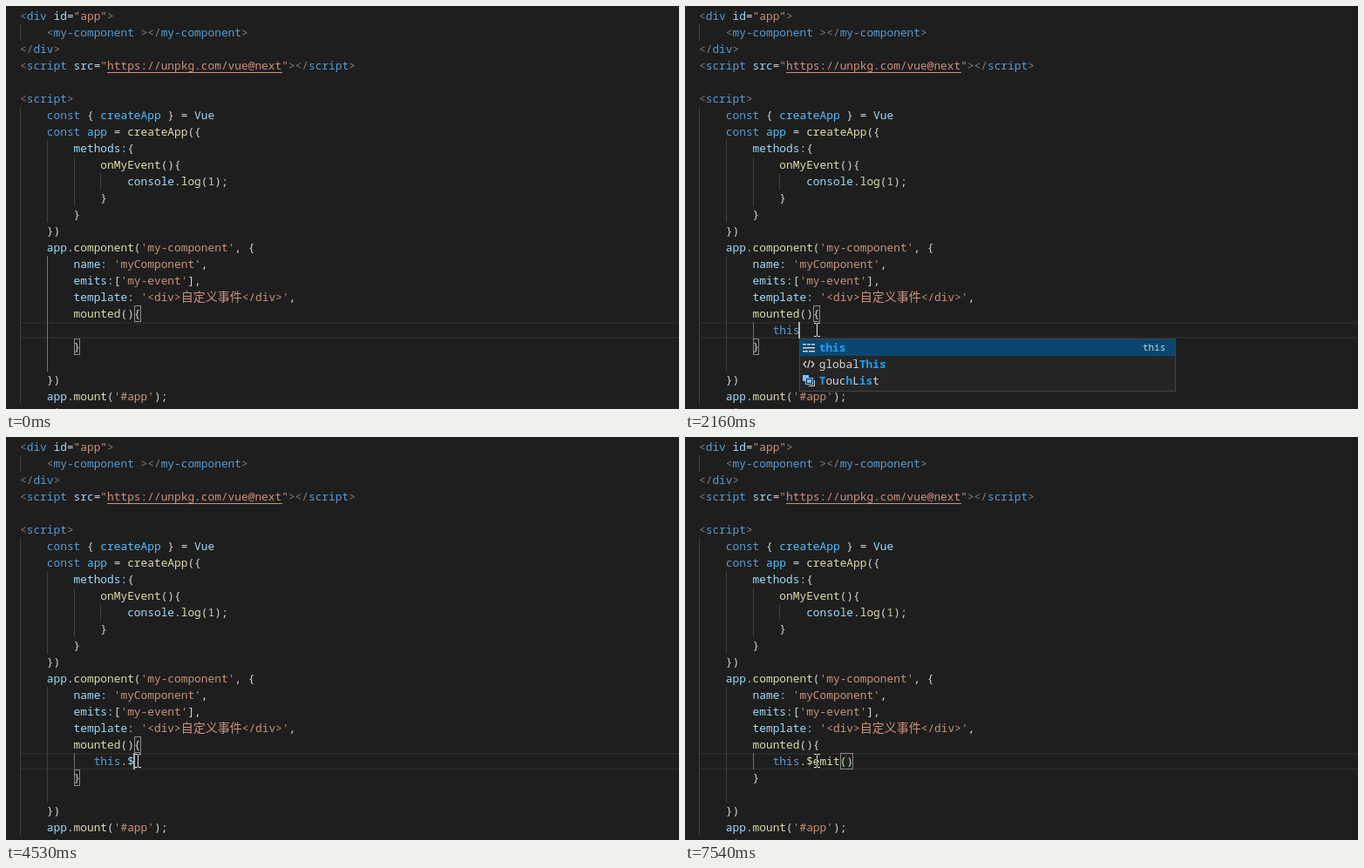
An HTML page with a canvas that plays this animation: 772 px wide and 463 px high, repeating every 8 s.

```html
<!DOCTYPE html>
<html lang="zh-CN">
<head>
<meta charset="utf-8">
<title>Code editor</title>
<style>
  html, body { margin: 0; width: 100%; height: 100%; overflow: hidden; background: #1e1e1e; }
  canvas { display: block; }
</style>
</head>
<body>
<canvas id="stage" width="772" height="463"></canvas>
<script>
const ctx = document.getElementById('stage').getContext('2d');
const LOOP = 8000, LEFT = 16, TOP = 2, ROW = 19, CHAR = 7.697, HAN = 14;
const MONO = '"Noto Sans Mono", "DejaVu Sans Mono", monospace';
const CODE_FONT = `12.83px ${MONO}`;
const BOLD_FONT = `bold 12.83px ${MONO}`;
const HAN_FONT = '14px "Noto Sans CJK SC", "Noto Sans CJK", sans-serif';

const COLORS = {
  g: '#808080', b: '#569cd6', a: '#9cdcfe', c: '#4fc1ff', s: '#ce9178',
  w: '#d4d4d4', y: '#dcdcaa', n: '#b5cea8'
};

// Tokens are separated by "|"; the first letter of each picks its colour.
const CODE = [
  'g<|bdiv |aid|w=|s"app"|g>',
  'g    <|bmy-component |g></|bmy-component|g>',
  'g</|bdiv|g>',
  'g<|bscript |asrc|w=|s"https://unpkg.com/vue@next"|g></|bscript|g>',
  '',
  'g<|bscript|g>',
  'b    const |w{ |ccreateApp |w} = |aVue',
  'b    const |capp |w= |ycreateApp|w({',
  'a        methods:|w{',
  'y            onMyEvent|w(){',
  'a                console|w.|ylog|w(|n1|w);',
  'w            }',
  'w        }',
  'w    })',
  "a    app|w.|ycomponent|w(|s'my-component'|w, {",
  "a        name: |s'myComponent'|w,",
  "a        emits:|w[|s'my-event'|w],",
  "a        template: |s'<div>自定义事件</div>'|w,",
  'y        mounted|w(){',
  '',
  'w        }',
  '',
  'w    })',
  "a    app|w.|ymount|w(|s'#app'|w);",
  'g</|bscript|g>'
];

// [column, first line, line count]
const GUIDES = [[0, 1, 1], [0, 6, 18], [4, 8, 5], [4, 15, 7], [8, 9, 3], [12, 10, 1]];

const EDIT_LINE = 19, EDIT_COL = 11;

// [start time, typed tokens, caret visible]
const STEPS = [
  [0, '', 0], [480, '', 1], [1150, '', 0],
  [1480, 'at', 1], [1820, 'athi', 1], [2160, 'bthis', 1],
  [2860, 'bthis|w.', 1], [3190, 'bthis|w.', 0], [3530, 'bthis|w.', 1], [4200, 'bthis|w.', 0],
  [4530, 'bthis|w.|a$', 1], [4860, 'bthis|w.|a$e', 1], [5560, 'bthis|w.|a$emi', 1],
  [5870, 'bthis|w.|a$emit', 1], [6540, 'bthis|w.|a$emit', 0],
  [6880, 'bthis|w.|y$emit|w()', 1], [7540, 'bthis|w.|y$emit|w()', 0]
];

const WORDS = ['app', 'component', 'console', 'createApp', 'emits', 'log', 'methods',
  'mount', 'mounted', 'name', 'onMyEvent', 'template'];

const colX = col => LEFT + col * CHAR;
const lineY = line => TOP + line * ROW;

function rect(color, x, y, w, h) {
  ctx.fillStyle = color;
  ctx.fillRect(x, y, w, h);
}

function frame(color, x, y, w, h) {
  ctx.strokeStyle = color;
  ctx.lineWidth = 1;
  ctx.strokeRect(x + .5, y + .5, w - 1, h - 1);
}

function path(color, width, ...lines) {
  ctx.strokeStyle = color;
  ctx.lineWidth = width;
  ctx.beginPath();
  for (const [x, y, ...rest] of lines) {
    ctx.moveTo(x, y);
    for (let i = 0; i < rest.length; i += 2) ctx.lineTo(rest[i], rest[i + 1]);
  }
  ctx.stroke();
}

function text(str, x, base, color, font = CODE_FONT) {
  ctx.fillStyle = color;
  for (const ch of str) {
    const han = ch > '\u2fff';
    ctx.font = han ? HAN_FONT : font;
    ctx.fillText(ch, x, base);
    x += han ? HAN : CHAR;
  }
  return x;
}

function tokens(source, x, base) {
  for (const part of source.split('|')) {
    if (part) x = text(part.slice(1), x, base, COLORS[part[0]]);
  }
}

function guide(col, line, count, color = '#404040') {
  rect(color, Math.round(colX(col)), lineY(line), 1, count * ROW);
}

function bracketBox(col, line, count = 1) {
  const x = Math.round(colX(col)), w = Math.round(colX(col + count)) - x;
  rect('rgba(0,100,0,.1)', x, lineY(line), w, ROW);
  frame('#888888', x, lineY(line), w, ROW);
}

function popupFrame(x, y, h) {
  rect('#252526', x, y, 432, h);
  frame('#454545', x, y, 432, h);
}

function keywordIcon(x, y) {
  for (const dy of [5, 9, 13]) rect('#d4d4d4', x + 4, y + dy, 14, 1.5);
  for (const dx of [8, 13]) rect('#094771', x + dx, y + 5, 1, 2);
  rect('#094771', x + 10, y + 13, 1, 2);
}

function tagIcon(x, y) {
  path('#d4d4d4', 1.2,
    [x + 8, y + 6, x + 5, y + 9.5, x + 8, y + 13],
    [x + 14, y + 6, x + 17, y + 9.5, x + 14, y + 13],
    [x + 12.3, y + 5, x + 9.7, y + 14]);
}

function variableIcon(x, y) {
  rect('#75beff', x + 4, y + 3, 7, 7);
  rect('#252526', x + 7, y + 6, 9, 8);
  frame('#75beff', x + 7, y + 6, 9, 8);
  rect('#75beff', x + 9, y + 8, 5, 4);
  path('#d4d4d4', 1, [x + 11, y + 15.5, x + 17.5, y + 15.5, x + 17.5, y + 9]);
}

function fileIcon(x, y) {
  path('#d4d4d4', 1.2,
    [x + 6, y + 3.5, x + 12, y + 3.5, x + 15.5, y + 7, x + 15.5, y + 16, x + 6, y + 16, x + 6, y + 3],
    [x + 11.5, y + 3.5, x + 11.5, y + 7.5, x + 15.5, y + 7.5]);
}

// Letters of the query are highlighted in order, starting at the given index.
function matched(word, query, start, x, base) {
  let next = 0;
  [...word].forEach((ch, i) => {
    const hit = i >= start && next < query.length && ch.toLowerCase() === query[next];
    if (hit) next++;
    x = text(ch, x, base, hit ? '#18a3ff' : '#d4d4d4', hit ? BOLD_FONT : CODE_FONT);
  });
}

function matchPopup(x, query) {
  const y = 383;
  popupFrame(x, 382, 61);
  rect('#094771', x + 1, y, 430, ROW);
  keywordIcon(x, y);
  tagIcon(x, y + ROW);
  variableIcon(x, y + 2 * ROW);
  [['this', 0], ['globalThis', 6], ['TouchList', 0]].forEach(([word, start], i) =>
    matched(word, query, start, x + 22.7, y + i * ROW + 14));
  ctx.fillStyle = '#c8d0d8';
  ctx.font = `11px ${MONO}`;
  ctx.fillText('this', x + 394, y + 13);
}

function wordPopup(x) {
  popupFrame(x, 131, 232);
  WORDS.forEach((word, i) => {
    const y = 134 + i * ROW, selected = word === 'emits';
    if (selected) rect('#094771', x + 1, y, 430, ROW);
    fileIcon(x, y);
    text(word, x + 24.7, y + 14, selected ? '#ffffff' : '#d4d4d4', selected ? BOLD_FONT : CODE_FONT);
  });
  rect('rgba(121,121,121,.4)', x + 421, 148, 10, 214);
}

function beam(x, y) {
  ctx.globalCompositeOperation = 'difference';
  for (const dy of [0, 15]) {
    rect('#ffffff', x, y + dy, 3, 1);
    rect('#ffffff', x + 4, y + dy, 3, 1);
  }
  rect('#ffffff', x + 3, y + 1, 1, 14);
  ctx.globalCompositeOperation = 'source-over';
}

function pointer(t) {
  if (t < 150) return;
  if (t < 480) return beam(163, 371);
  if (t < 810) {
    ctx.fillStyle = 'rgba(255,255,0,.47)';
    ctx.beginPath();
    ctx.arc(149, 371, 12, 0, 2 * Math.PI);
    ctx.fill();
  }
  beam(148, 364);
}

function draw(t) {
  const [, typed, caretOn] = STEPS.findLast(step => step[0] <= t);
  const plain = typed.split('|').map(part => part.slice(1)).join('');
  const caretX = colX(EDIT_COL + plain.length - (plain.endsWith(')') ? 1 : 0));
  const y = lineY(EDIT_LINE);

  rect('#1e1e1e', 0, 0, 772, 463);
  rect('#282828', LEFT, y, 772 - LEFT, 2);
  rect('#282828', LEFT, y + ROW - 2, 772 - LEFT, 2);

  for (const g of GUIDES) guide(...g);
  if (typed) guide(8, EDIT_LINE, 1, '#707070');
  else guide(4, 15, 7, '#707070');

  if (t < 7210) {
    bracketBox(17, 18);
    bracketBox(8, 20);
  } else {
    bracketBox(21, EDIT_LINE, 2);
  }

  CODE.forEach((line, i) => tokens(line, LEFT, lineY(i) + 14));
  rect(COLORS.s, 116, 76, 201, 1);
  tokens(typed, colX(EDIT_COL), y + 14);
  if (caretOn) rect('#aeafad', Math.round(caretX) - 1, y, 2, ROW);

  if (t >= 1820 && t < 2860) matchPopup(Math.round(caretX), plain);
  if (t >= 2860 && t < 4530) wordPopup(Math.round(caretX));
  pointer(t);
}

const start = performance.now();
function tick() {
  draw((performance.now() - start) % LOOP);
  requestAnimationFrame(tick);
}
tick();
</script>
</body>
</html>
```
